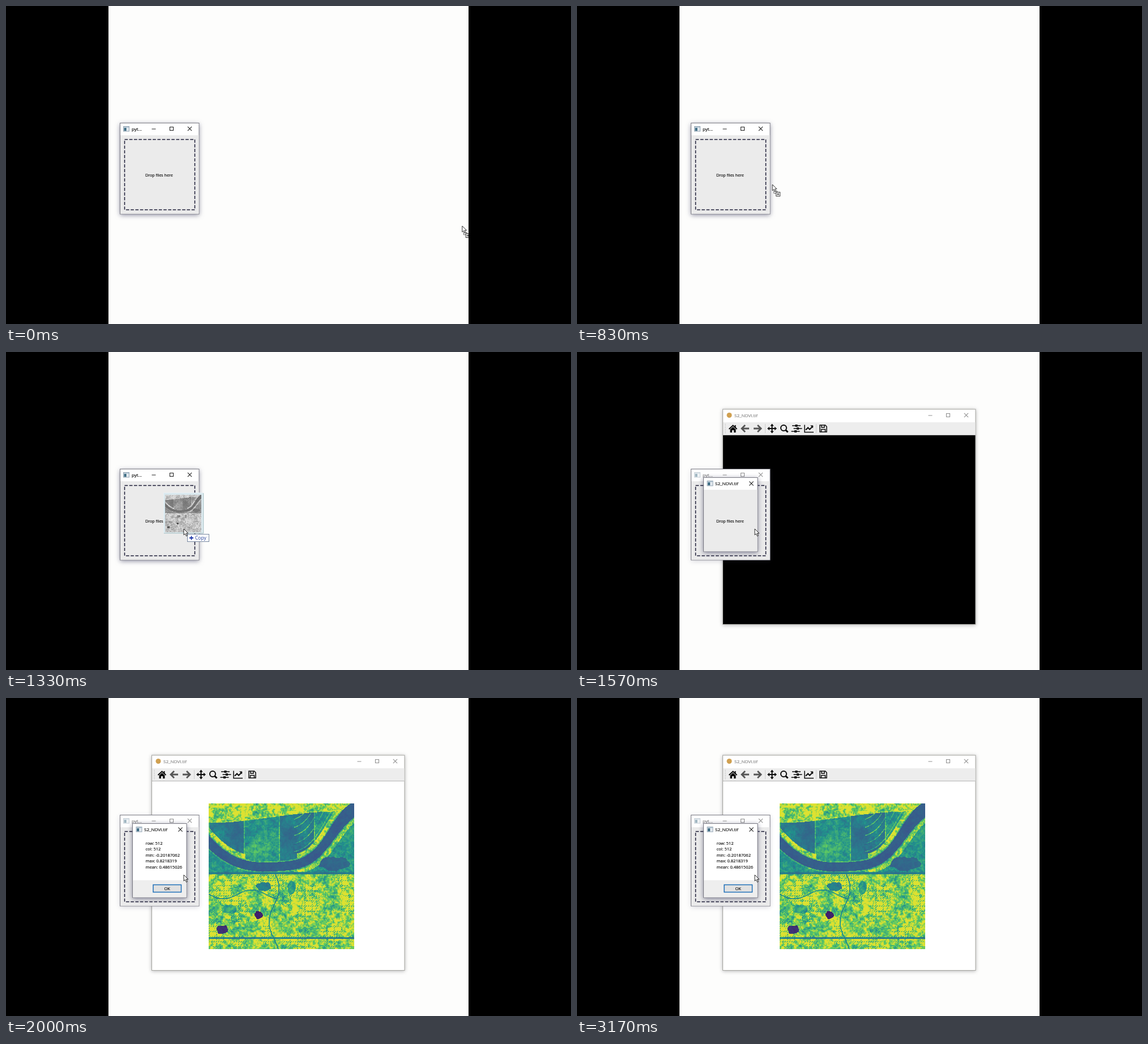
Write an HTML page with a canvas that moves like this. It is 998x561 px and loops after 3.26 s.

```html
<!DOCTYPE html>
<html lang="en">
<head>
<meta charset="utf-8">
<title>Drop files</title>
<style>
html, body { margin: 0; width: 100%; height: 100%; overflow: hidden; background: #000; }
#stage { position: absolute; left: 0; top: 0; width: 998px; height: 561px; background: #fdfdfc; clip-path: inset(0 181px); overflow: hidden; }
#stage > *, #cursor > * { position: absolute; left: 0; top: 0; }
svg { display: block; overflow: visible; }
text { font-family: "Open Sans", "Noto Sans", sans-serif; fill: #080808; stroke: #080808; stroke-width: .15; }
.title { font-size: 8px; }
.body { font-size: 7.5px; }
.drop { font-size: 7.1px; }
.frame { fill: #fff; stroke: #7b7b84; }
.figure .frame { stroke: #a5a5a0; }
.active { filter: drop-shadow(0 2px 4px rgba(50, 50, 85, .55)); }
.idle { filter: drop-shadow(0 1px 3px rgba(70, 70, 75, .4)); }
.line { fill: none; stroke: #222; stroke-width: 1.1; }
.dim { opacity: .5; }
.tools { fill: none; stroke: #0a0a0a; stroke-width: 2; }
.solid { fill: #0a0a0a; stroke: none; }
.nav { stroke: #555; stroke-width: 2.8; }
.thin { stroke-width: 1.5; }

#cursor { animation: drag 3.26s linear infinite; }
#raster { left: 358px; top: 186px; }
#thumb { left: -33px; top: -60px; width: 64px; height: 66px; filter: grayscale(1) contrast(.75) brightness(1.15); }
#halo { left: -36px; top: -64px; width: 70px; height: 71px; background: #d9e8ee; border: 1px solid #e6f0f4; box-shadow: 1px 1px 1px #a9c4c8; box-sizing: border-box; }
.badge, .carried, .figure, .dialog, .pending, .done, .caption, .glow { animation: 3.26s step-end infinite; }
.badge { animation-name: badge; }
.carried { animation-name: carried; }
.figure { animation-name: figure; }
.dialog { animation-name: dialog; }
.pending { animation-name: pending; }
.done { animation-name: done; }
.caption { animation-name: caption; }
.glow { animation-name: glow; }

@keyframes drag {
  0% { transform: translate(806px, 388px); animation-timing-function: cubic-bezier(.4, .2, .8, .8); }
  8.5% { transform: translate(680px, 384px); animation-timing-function: cubic-bezier(.25, .3, .5, 1); }
  25.4% { transform: translate(346px, 315px); animation-timing-function: ease-out; }
  31%, 100% { transform: translate(314px, 312px); }
}
@keyframes badge { 0% { opacity: 1 } 26.6%, 100% { opacity: 0 } }
@keyframes carried { 0% { opacity: 0 } 26.6% { opacity: 1 } 43.8%, 100% { opacity: 0 } }
@keyframes figure { 0% { opacity: 0 } 45.9%, 100% { opacity: 1 } }
@keyframes dialog { 0% { opacity: 0 } 46.9%, 100% { opacity: 1 } }
@keyframes pending { 0% { opacity: 1 } 49.9%, 100% { opacity: 0 } }
@keyframes done { 0% { opacity: 0 } 49.9%, 100% { opacity: 1 } }
@keyframes caption { 0% { opacity: 1 } 45.9%, 100% { opacity: .5 } }
@keyframes glow { 0% { opacity: 1 } 45.9%, 100% { opacity: .35 } }
</style>
</head>
<body>
<div id="stage">
  <svg width="998" height="561">
    <defs>
      <g id="app">
        <rect x=".5" y=".5" width="10" height="8.5" fill="#e3e9ee" stroke="#94a5b3"/>
        <path d="M1 1h9v1.6h-9z" fill="#b4c6d4"/>
        <path d="M1.6 3h4v5.2h-4z" fill="#3b6a82"/>
      </g>
      <path id="close" class="line" d="M-3.6-3.6 3.6 3.6M3.6-3.6-3.6 3.6"/>
      <g id="buttons">
        <path class="line" d="M-67 .5h7M-35-3h6v6h-6z"/>
        <use href="#close"/>
      </g>
      <text id="hint" class="drop" x="246" y="300.6">Drop files here</text>
      <path id="arrow" class="nav" d="M0-6-6 0 0 6M-5.5 0H7"/>
      <g id="spoke"><path d="M0 0v-6"/><path class="solid" d="M0-8.5 3.2-4.500h-6.400z"/></g>
      <g id="slider"><path class="thin" d="M-7.500 0h15"/><path class="solid" d="M-2-2h4v4h-4z"/></g>
    </defs>

    <g class="figure">
      <rect class="frame idle" x="257.5" y="101" width="446.5" height="379.5"/>
      <path d="M258 124h445.5v22h-445.5z" fill="#ededed"/>
      <path d="M258 146.5h445.5" stroke="#b5b5b5"/>
      <g class="dim">
        <text class="title" x="278" y="115">S2_NDVI.tif</text>
        <use href="#buttons" x="687.5" y="111.5"/>
      </g>
      <circle cx="269" cy="111.5" r="4.5" fill="#d0a050"/>
      <path d="M262 127v17" stroke="#999" stroke-dasharray="1 2"/>
      <path d="M332.5 127v16M422.5 127v16" stroke="#ccc"/>
      <g class="tools">
        <g transform="translate(275.5 135)">
          <path d="M-7 1 0-5.500 7 1"/>
          <path class="solid" d="M3-6h2v5h-2zM0-3 5 1.500v5.500h-3.500v-4h-3v4h-3.500v-5.500z"/>
        </g>
        <use href="#arrow" x="297" y="135"/>
        <use href="#arrow" transform="translate(319 135) scale(-1 1)"/>
        <g transform="translate(344.5 135)">
          <use href="#spoke"/>
          <use href="#spoke" transform="rotate(90)"/>
          <use href="#spoke" transform="rotate(180)"/>
          <use href="#spoke" transform="rotate(270)"/>
        </g>
        <circle cx="365" cy="134" r="5"/>
        <path d="M368.5 137.500l4 4" stroke-width="3"/>
        <use href="#slider" x="387.5" y="130"/>
        <use href="#slider" x="390" y="135"/>
        <use href="#slider" x="386" y="140"/>
        <g transform="translate(402 141.500)">
          <path class="thin" d="M0-13V0h16"/>
          <path d="M2-4l4-4 3 3 6-6"/>
          <path class="solid" d="M10-12h5v5z"/>
        </g>
        <g class="thin" transform="translate(435 135)">
          <path d="M-6-6h9.500l2.500 2.500v9.500h-12z"/>
          <path d="M-3-6v4h5v-4M-3.500 6v-4.500h7v4.500"/>
        </g>
      </g>
      <path class="pending" d="M258 147h445.5v333h-445.5z"/>
    </g>

    <g>
      <rect class="glow active" x="201.5" y="206.5" width="139.5" height="160.5" fill="#fff"/>
      <rect class="frame" x="201.5" y="206.5" width="139.5" height="160.5"/>
      <path d="M202 228h138.5v138.5h-138.5z" fill="#ebebeb"/>
      <g class="caption">
        <use href="#app" x="207" y="212"/>
        <text class="title" x="222" y="220">pyt...</text>
        <use href="#buttons" x="324.5" y="216.5"/>
      </g>
      <rect x="209.5" y="235.5" width="124" height="124" fill="none" stroke="#1b1b35" stroke-width="1.5" stroke-dasharray="5.7 2.57"/>
      <use href="#hint"/>
    </g>

    <g class="dialog">
      <rect class="frame active" x="223.5" y="221.5" width="95.5" height="130.5"/>
      <use href="#app" x="229.5" y="227"/>
      <text class="title" x="244" y="235">S2_NDVI.tif</text>
      <use href="#close" x="308" y="232"/>
      <g class="pending">
        <path d="M224 243h94.5v108.5h-94.5z" fill="#ebebeb"/>
        <use href="#hint"/>
      </g>
      <g class="done">
        <path d="M224 321.5h94.5v30h-94.5z" fill="#eee"/>
        <g class="body">
          <text x="246.5" y="258.8">row: 512</text>
          <text x="246.5" y="269.3">col: 512</text>
          <text x="246.5" y="279.8">min: -0.20187062</text>
          <text x="246.5" y="290.3">max: 0.8218319</text>
          <text x="246.5" y="300.8">mean: 0.48615026</text>
          <rect x="260" y="329.5" width="49.5" height="13" fill="#e1e1e1" stroke="#1f6fb8" stroke-width="1.5"/>
          <text x="284.7" y="338.8" text-anchor="middle">OK</text>
        </g>
      </g>
    </g>
  </svg>

  <canvas id="raster" class="done" width="257" height="257"></canvas>

  <div id="cursor">
    <div id="halo" class="carried"></div>
    <canvas id="thumb" class="carried" width="64" height="66"></canvas>
    <svg width="1" height="1">
      <g class="badge">
        <path d="M2.5 11.5h6v4h-6z" fill="#fff" stroke="#666"/>
        <rect x="6.5" y="13.5" width="7" height="7" fill="#fff" stroke="#333"/>
        <path d="M10 15v4M8 17h4" stroke="#222"/>
      </g>
      <g class="carried">
        <rect x="6.5" y="9.5" width="38" height="13" fill="#fff" stroke="#7787a0"/>
        <path d="M13.5 12.5v7M10 16h7" stroke="#1b35a8" stroke-width="1.8"/>
        <text x="20" y="19" font-size="8.5" style="fill:#24409a;stroke:none">Copy</text>
      </g>
      <path d="M0 0v10.8l2.5-2.3 1.9 4.3 1.9-.8-1.9-4.2h3.4z" fill="#fff" stroke="#111" stroke-width=".9"/>
    </svg>
  </div>
</div>

<script>
const size = 257;
const raster = document.getElementById('raster');

let seed = 7;
const rand = () => (seed = seed * 16807 % 2147483647) / 2147483647;
const clamp = (v, lo, hi) => Math.min(hi, Math.max(lo, v));
const smooth = v => (v = clamp(v, 0, 1)) * v * (3 - 2 * v);

// Smooth value noise with features about `step` pixels wide.
function noise(step) {
  const n = Math.ceil(size / step) + 2;
  const grid = Float32Array.from({ length: n * n }, rand);
  const mix = (k, a) => grid[k] * (1 - a) + grid[k + 1] * a;
  return (x, y) => {
    const u = x / step, v = y / step, i = Math.floor(u), j = Math.floor(v);
    const k = j * n + i, b = v - j;
    return mix(k, u - i) * (1 - b) + mix(k + n, u - i) * b;
  };
}
const fine = noise(2), mid = noise(5), broad = noise(17);

const ponds = [
  { x: 97, y: 146, rx: 14, ry: 8, v: .42 },
  { x: 88, y: 196, rx: 7, ry: 7, v: .1 },
  { x: 23, y: 222, rx: 10, ry: 8, v: .15 },
  { x: 146, y: 148, rx: 7, ry: 13, v: .55 },
  { x: 35, y: 186, rx: 14, ry: 8, v: .6 },
  { x: 222, y: 106, rx: 28, ry: 12, v: .33 }
];

const river = x => 112 - 115 / (1 + Math.exp((216 - x) / 20)) - 44 * Math.max(0, 1 - x / 105) ** 2.5;

function town(x, y) {
  const lane = 115 + 9 * Math.sin(y / 19);
  const path = 160 + 8 * Math.sin(x / 16);
  if (Math.abs(y - 237) < 2) return .42;
  if (Math.abs(x - lane) < 1 || x < lane && Math.abs(y - path) < 1) return .5;
  const street = (x % 13 < 2 || y % 9 < 2) && (x + y) % 4 < 2;
  if (street && broad(y, x) > .5) return .62;
  return .76 + .2 * broad(y, x);
}

function country(x, y) {
  const d = (river(x) - y) / Math.hypot(1, river(x + .5) - river(x - .5));
  const half = 8 + 4 * smooth((x - 200) / 57);
  const side = Math.abs(d) - half;
  if (side < 0) return .3;
  if (y < 34 - 20 * smooth(x / 220)) return .86;
  if (side < 2) return .65;
  if (d < 0) return side < 9 && x > 150 ? .82 : .53;
  if (side < 10 && Math.abs(x - 110) > 45) return .84;
  if (x > 150 && side % 14 < 1.5 || x % 62 < 1.5) return .68;
  return .47 - .06 * Math.cos(Math.PI * Math.floor(x / 62)) + .14 * (broad(y, x) - .5);
}

function greenness(x, y) {
  const pond = ponds.find(p => Math.hypot((x - p.x) / p.rx, (y - p.y) / p.ry) < .8 + .4 * mid(y, x));
  if (pond) return pond.v;
  if (y > 124) return town(x, y);
  return y > 120 ? .42 : country(x, y);
}

function viridis(v) {
  const stops = [[68, 1, 84], [59, 82, 139], [33, 145, 140], [94, 201, 98], [253, 231, 37]];
  const w = clamp(v, 0, .95) * 4, k = Math.floor(w);
  return stops[k].map((c, i) => c + (stops[k + 1][i] - c) * (w - k));
}

const g = raster.getContext('2d');
const img = g.createImageData(size, size);
for (let y = 0; y < size; y++) {
  for (let x = 0; x < size; x++) {
    const v = greenness(x, y);
    const n = fine(x, y) * .35 + mid(x, y) * .4 + broad(x, y) * .25 - .49;
    const gain = .12 + 1.8 * Math.max(0, v - .35);
    img.data.set([...viridis(v + n * gain), 255], (y * size + x) * 4);
  }
}
g.putImageData(img, 0, 0);
document.getElementById('thumb').getContext('2d').drawImage(raster, 0, 0, 64, 66);
</script>
</body>
</html>
```
